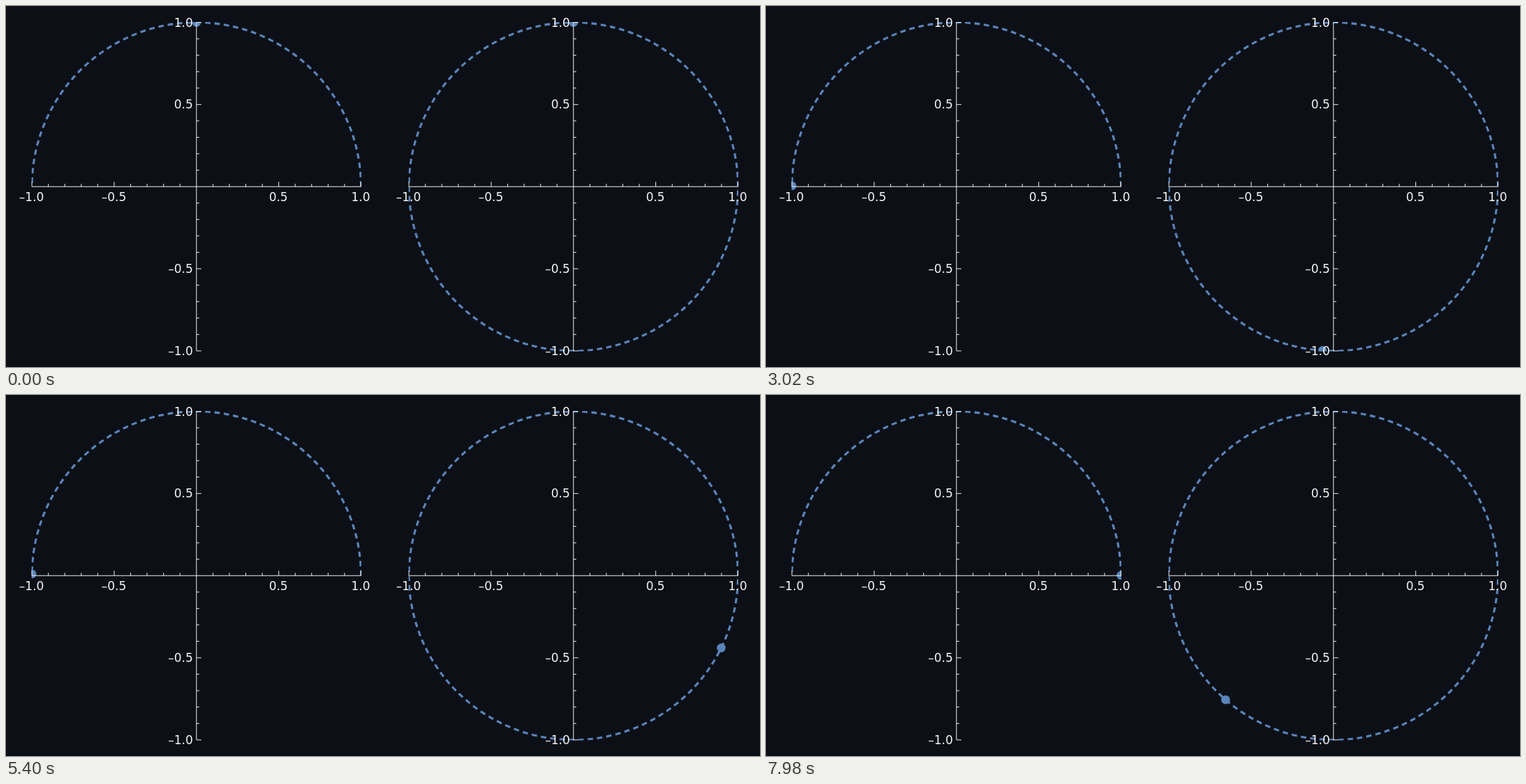
An HTML page that plays this animation: 1080 by 518 pixels, repeating every 8000 ms.

```html
<!DOCTYPE html>
<html lang="en">
<head>
<meta charset="utf-8">
<title>Two pendulums</title>
<style>
  html, body { margin: 0; width: 100%; height: 100%; overflow: hidden; background: #0c1016; }
  svg { display: block; width: 1080px; height: 518px; }
  text { font: 17px "DejaVu Sans", sans-serif; fill: #f4f4f4; }
  .axis { stroke: #f0f0f0; stroke-width: 1; fill: none; }
  .track { stroke: #5b84bb; stroke-width: 3.1; stroke-dasharray: 7.76 5.7; fill: none; }
  .bob { fill: #5b84bb; }
</style>
</head>
<body>
<svg id="stage" viewBox="0 0 1080 518"></svg>
<script>
const NS = "http://www.w3.org/2000/svg";
const LOOP = 8000, STEP = 20;
const R = 235.7, CY = 259.2;
const DEG = 180 / Math.PI;
const stage = document.getElementById("stage");

function add(parent, tag, attrs, label) {
  const el = document.createElementNS(NS, tag);
  for (const name in attrs) el.setAttribute(name, attrs[name]);
  if (label) el.textContent = label;
  parent.appendChild(el);
  return el;
}

const format = v => v.toFixed(1).replace("-", "\u2013");

function addPlot(id, cx, full) {
  const clip = add(stage, "clipPath", { id });
  add(clip, "rect", { x: cx - R - 0.5, y: CY - R - 0.5, width: 2 * R + 1, height: 2 * R + 1 });
  const inside = add(stage, "g", { "clip-path": `url(#${id})` });

  const half = `A${R} ${R} 0 0 0 `;
  let track = `M${cx + R} ${CY}${half}${cx - R} ${CY}`;
  if (full) track += `${half}${cx + R} ${CY}`;
  add(inside, "path", { class: "track", d: track });
  const bob = add(inside, "circle", { class: "bob", r: 6.3 });

  // Axes with ticks pointing up and to the right
  let d = `M${cx - R} ${CY}H${cx + R}M${cx} ${CY - R}V${CY + R}`;
  for (let i = -10; i <= 10; i++) {
    if (!i) continue;
    const size = i % 5 ? 4 : 7;
    const x = cx + i / 10 * R, y = CY - i / 10 * R;
    d += `M${x} ${CY}v${-size}M${cx} ${y}h${size}`;
  }
  add(stage, "path", { class: "axis", d });

  for (const v of [-1, -0.5, 0.5, 1]) {
    add(stage, "text", { x: cx + v * R - 0.5, y: 279.6, "text-anchor": "middle" }, format(v));
    add(stage, "text", { x: cx - 5, y: CY - v * R + 6, "text-anchor": "end" }, format(v));
  }

  // Angle in degrees from the top, positive to the right
  return angle => {
    bob.setAttribute("cx", cx + R * Math.sin(angle / DEG));
    bob.setAttribute("cy", CY - R * Math.cos(angle / DEG));
  };
}

// Motion through the upright position at t = 0
const topple = (t, push) => 4 * DEG * Math.atan(push * Math.sinh(3.13 * t));

// Moments, in seconds, at which the free pendulum passes its lowest point
const lows = [1.2, 3.008, 4.36, 5.657, 6.71, 7.8, 8.85];

// Damped swing: long half swings linger more at their ends
function swing(t) {
  const i = lows.findLastIndex(low => low <= t);
  const span = lows[i + 1] - lows[i];
  const s = Math.sin(Math.PI * (t - lows[i]) / span);
  const bend = s * span / Math.sqrt(1 + (span * span - 1) * s * s);
  const reach = 0.97 - 0.046 * (t - lows[0]);
  return (i % 2 ? -2 : 2) * DEG * Math.asin(reach * bend);
}

const freeAngle = t => t < lows[0] ? -topple(t, 0.0469) : 180 - swing(t);

// Falls onto the floor, then is thrown over to the other side
function floorAngle(t) {
  const angle = t < 5.4 ? -topple(t, 0.0469) : topple(t - 5.942, 0.156);
  return Math.max(-89.7, Math.min(89.9, angle));
}

const setLeft = addPlot("leftBox", 272.8, false);
const setRight = addPlot("rightBox", 812.8, true);
const start = performance.now();

function draw() {
  const ms = (performance.now() - start) % LOOP;
  const t = Math.floor(ms / STEP) * STEP / 1000;
  setLeft(floorAngle(t));
  setRight(freeAngle(t));
  requestAnimationFrame(draw);
}
draw();
</script>
</body>
</html>
```
